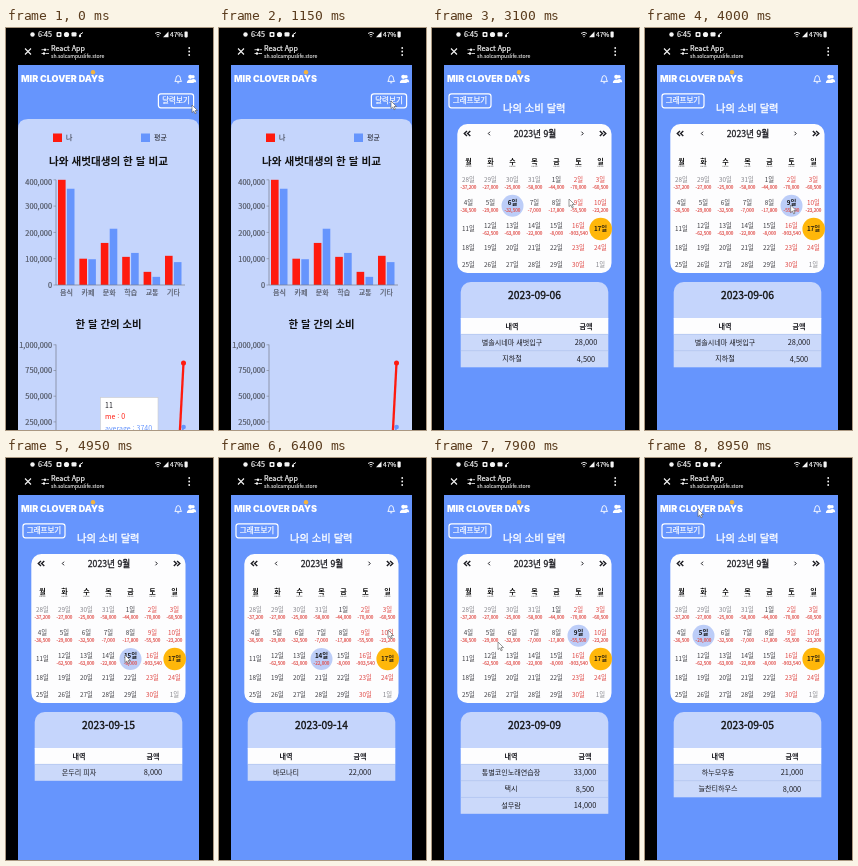
An HTML page that plays this animation: 207x402 px, repeating every 9 s.

```html
<!DOCTYPE html>
<html lang="ko">
<head>
<meta charset="utf-8">
<title>React App</title>
<style>
html, body { margin: 0; width: 100%; height: 100%; overflow: hidden; background: #000; }
svg { display: block; width: 100vw; height: 100vh; font-family: "Noto Sans CJK KR", "Noto Sans CJK", sans-serif; }
.on { fill: #111; font-weight: 700; }
</style>
</head>
<body>
<svg id="stage" viewBox="0 0 207 402"></svg>
<script>
const LOOP = 9000, STEP = 50, PAGE_SWITCH = 1300, TIP_END = 100;
const LOAD = 150; // delay between choosing a day and its list
const BLUE = '#6695fd', PALE = '#c5d5fc', RED = '#ff1a0e', INK = '#1c1c22';

const attrs = o => Object.entries(o).map(([k, v]) => ` ${k}="${v}"`).join('');
const rect = (x, y, width, height, fill, more = {}) =>
  `<rect${attrs({ x, y, width, height, fill, ...more })}/>`;
const circle = (cx, cy, r, fill) => `<circle${attrs({ cx, cy, r, fill })}/>`;
const line = (d, stroke, width = 1, more = {}) =>
  `<path${attrs({ d, stroke, 'stroke-width': width, fill: 'none', ...more })}/>`;
const shape = (d, fill) => `<path${attrs({ d, fill })}/>`;
const group = (id, body) => `<g id="${id}">${body}</g>`;
const money = n => n.toLocaleString('en-US');

// y is the middle of the text line; a thin outline makes the medium weight
function text(x, y, str, size, fill = INK, anchor = 'middle', weight = 400, more = {}) {
  const medium = weight === 500 ? { stroke: fill, 'stroke-width': size * 0.03 } : {};
  return `<text${attrs({
    x, y: y + size * 0.36, 'font-size': size, fill, 'text-anchor': anchor,
    'font-weight': weight === 500 ? 400 : weight, ...medium, ...more
  })}>${str}</text>`;
}

function phoneBars() {
  const w = '#f4f4f4';
  return circle(26.5, 6.5, 2.2, w) +
    text(32, 6.5, '6:45', 7.2, w, 'start', 500) +
    rect(50.5, 4, 5, 5, w, { rx: 1 }) + circle(53, 6.5, 1.2, '#000') +
    circle(60.5, 6.5, 2.6, w) +
    rect(65.5, 4.2, 5, 4.4, w, { rx: 1 }) +
    line('M74 8.5V6.5L77 4.5', w, 1) + circle(74, 8, 1.2, w) +
    line('M149 5.5Q152 3 155 5.5M150.5 7Q152 5.7 153.5 7', w, 0.9) + circle(152, 8.6, 0.7, w) +
    shape('M157 9.2L162.5 3.6V9.2Z', w) +
    text(164, 6.5, '47%', 6.6, w, 'start', 500) +
    rect(178.5, 3.6, 3.2, 5.8, w, { rx: 0.8 }) +
    line('M19 20.5L25 26.5M25 20.5L19 26.5', w, 1.1) +
    line('M35.5 21.7H38M40.5 21.7H43M35.5 25.5H37M39.5 25.5H43', w, 0.8) +
    circle(39, 21.7, 1.2, w) + circle(38, 25.5, 1.2, w) +
    text(45, 20.8, 'React App', 7.2, w, 'start', 500) +
    text(45, 28.4, 'sh.solcampuslife.store', 5.1, '#d8d8d8', 'start', 500) +
    [20, 23.5, 27].map(y => circle(183.2, y, 0.9, w)).join('');
}

function siteHeader() {
  return circle(87, 44.2, 2.2, '#f4b43d') +
    text(15, 51, 'MIR CLOVER DAYS', 9, '#fff', 'start', 900, { 'font-family': 'Inter, sans-serif' }) +
    line('M168.8 53.4Q170 52.3 170 50.2Q170 47.8 172.2 47.6Q174.4 47.8 174.4 50.2Q174.4 52.3 175.6 53.4Z', '#fff', 0.9) +
    line('M171.2 54.8H173.2', '#fff', 0.9) +
    circle(187, 48.7, 1.7, '#fff') + shape('M184.8 54.2Q185 51 187.3 51Q190 51 190.2 54.2Z', '#fff') +
    circle(184.3, 48.8, 2.1, '#fff') + shape('M180.8 55Q181 51.5 184.3 51.5Q187.6 51.5 187.8 55Z', '#fff');
}

const button = (x, width, label) =>
  rect(x, 65.8, width, 14, 'none', { rx: 2.5, stroke: '#fff', 'stroke-width': 1.2 }) +
  text(x + width / 2, 72.6, label, 7.5, '#fff', 'middle', 500);

function graphPage() {
  const mine = [400, 100, 160, 107, 50, 111], mean = [366, 98, 214, 122, 31, 87];
  const names = ['음식', '카페', '문화', '학습', '교통', '기타'];
  const base = 257, unit = 105.2 / 400, axis = '#777c8c', label = '#555a68';
  let s = button(152.4, 35.2, '달력보기') +
    shape('M12 402V101Q12 91 22 91H183Q193 91 193 101V402Z', PALE) +
    rect(47, 105.5, 9, 8.5, RED) + text(60, 109.8, '나', 7, INK, 'start') +
    rect(135, 105.5, 9, 8.5, BLUE) + text(148, 109.8, '평균', 7, INK, 'start') +
    text(102.5, 133, '나와 새벗대생의 한 달 비교', 10.6, '#111', 'middle', 700);
  for (let i = 0; i <= 4; i++) {
    const y = base - i * 100 * unit;
    s += line(`M47.5 ${y}H50`, axis, 0.6) +
      text(46, y + (i === 4 ? 3 : 0.5), money(i * 100000), 7.4, label, 'end', 500);
  }
  names.forEach((name, i) => {
    const x = 50 + 21.4 * i;
    s += rect(x + 2, base - mine[i] * unit, 7.6, mine[i] * unit, RED) +
      rect(x + 10.9, base - mean[i] * unit, 7.6, mean[i] * unit, BLUE) +
      text(x + 10.5, 264, name, 7, label, 'middle', 500);
  });
  s += line('M50 151.8V257H179', axis, 0.7) +
    text(102.5, 296.5, '한 달 간의 소비', 10.4, '#111', 'middle', 700) +
    line('M50 316.5V402', axis, 0.7);
  for (let i = 0; i < 4; i++) {
    const y = 316.8 + i * 25.7;
    s += line(`M47.5 ${y}H50`, axis, 0.6) +
      text(46, y + 0.3, money(1e6 - i * 250000), 7.4, label, 'end', 500);
  }
  return s + line('M172 417L177.6 399', BLUE, 1.6) + circle(177.6, 399, 2.3, BLUE) +
    line('M173 420L177.5 335', RED, 2.3) + circle(177.5, 335, 2.5, RED) +
    group('tip', rect(94.5, 369.5, 57.5, 40, '#fff', { stroke: '#ccc', 'stroke-width': 0.6 }) +
      text(99, 377.5, '11', 7, INK, 'start') +
      text(99, 388.5, 'me : 0', 7, RED, 'start') +
      text(99, 400, 'average : 3740', 7, BLUE, 'start'));
}

const colX = i => 36.5 + 22 * i;
const rowY = [154.8, 177.8, 201, 220, 236.5];
const spent = [
  [37200, 27000, 25000, 58000, 44000, 70000, 60500],
  [36500, 29000, 32500, 7000, 17800, 55500, 23200],
  [0, 62500, 63000, 22000, 8000, 903540, 0]
];

function calendarPage() {
  let s = button(17, 42, '그래프보기') +
    text(102.3, 80.3, '나의 소비 달력', 10.3, '#fff', 'middle', 500) +
    rect(25.3, 96, 154.2, 149, '#fdfdfe', { rx: 10 }) +
    text(103, 105.5, '2023년 9월', 8.7, INK, 'middle', 500) +
    line('M35 103L32.3 105.5L35 108M38.3 103L35.6 105.5L38.3 108M167.8 103L170.5 105.5L167.8 108M171.1 103L173.8 105.5L171.1 108', INK, 1.4) +
    line('M58 103.7L56.3 105.5L58 107.3M149.5 103.7L151.2 105.5L149.5 107.3', INK, 1) +
    circle(168.7, 201, 11.3, '#ffb70a') +
    `<circle id="pick" r="11" fill="#bccdf8"/>`;
  [...'월화수목금토일'].forEach((d, i) => {
    s += text(colX(i), 133.5, d, 7, '#111', 'middle', 700) +
      line(`M${colX(i) - 3} 138.3h6.4`, '#333', 0.6, { 'stroke-dasharray': '1 .6' });
  });
  for (let n = 0; n < 35; n++) {
    const col = n % 7, row = Math.floor(n / 7);
    const day = n < 4 ? n + 28 : n < 34 ? n - 3 : 1;
    const inMonth = n > 3 && n < 34, today = n === 20;
    const cost = spent[row]?.[col];
    const fill = today ? '#2a2010' : !inMonth ? '#85858b' : col > 4 ? '#df4440' : '#3c3c42';
    s += text(colX(col), rowY[row] - (cost ? 3 : 0), day + '일', 6.3, fill, 'middle', today ? 700 : 400,
      inMonth ? { id: 'day' + day } : {});
    if (cost) s += text(colX(col), rowY[row] + 4.1, '-' + money(cost), 4.7, '#e0504c', 'middle', 500);
  }
  return s + group('panel', '');
}

// per day: centre of the first column, then name and amount pairs
const details = {
  5: [73, ['하누모우동', 21000], ['늘찬티하우스', 8000]],
  6: [80, ['별솔시네마 새벗입구', 28000], ['지하철', 4500]],
  9: [79, ['통별코인노래연습장', 33000], ['택시', 8500], ['설무람', 14000]],
  14: [67, ['바모나티', 22000]],
  15: [73, ['온두리 피자', 8000]]
};

function panel(day) {
  const [cx, ...rows] = details[day], ax = cx + 74, left = 28.7, width = 147.6;
  let s = rect(left, 254, width, 46, PALE, { rx: 10 }) +
    text(102.5, 266.8, '2023-09-' + String(day).padStart(2, '0'), 10.3, '#111', 'middle', 500) +
    rect(left, 290, width, 16.3, '#fdfdfe') +
    text(cx, 298, '내역', 7.1, INK, 'middle', 700) + text(ax, 298, '금액', 7.1, INK, 'middle', 700);
  rows.forEach(([name, cost], i) => {
    const y = 306.3 + 16.5 * i;
    s += rect(left, y, width, 16.5, '#cbd9fa') + line(`M${left} ${y}h${width}`, '#b9c6e6', 0.5) +
      text(cx, y + 8.1, name, 7.1) + text(ax, y + 8.1, money(cost), 7.4);
  });
  return s;
}

const picks = [[2800, 6], [3900, 9], [4700, 15], [6150, 14], [6950, 9], [8650, 5]];
const track = [
  [0, 186, 77], [500, 178, 75], [950, 172, 73], [1200, 172, 73], [1700, 138, 143], [1900, 133, 147],
  [2700, 83, 176], [2900, 84, 176], [3100, 137, 171], [3500, 147, 176], [3900, 147, 176],
  [4650, 119, 197], [5100, 119, 197], [5500, 124, 204], [5850, 124, 204], [6000, 102, 200], [6150, 102, 200],
  [6400, 169, 172], [6800, 148, 176], [7100, 148, 176], [7900, 66, 184], [8500, 58, 176], [8650, 58, 176],
  [8950, 53, 51], [9000, 53, 51]
];

function cursorAt(t) {
  const i = track.findIndex(p => p[0] > t);
  const [t0, x0, y0] = track[i - 1], [t1, x1, y1] = track[i];
  const u = (t - t0) / (t1 - t0), e = u * u * (3 - 2 * u);
  return [x0 + (x1 - x0) * e, y0 + (y1 - y0) * e];
}

const $ = id => document.getElementById(id);
$('stage').innerHTML = rect(0, 0, 207, 402, '#000') + phoneBars() +
  rect(12, 37, 181, 365, BLUE) + siteHeader() +
  group('graph', graphPage()) + group('calendar', calendarPage()) +
  '<path id="cursor" d="M0 0V7.6L1.8 6L3 8.8L4.3 8.2L3.1 5.5H5.5Z" fill="#fff" stroke="#555" stroke-width=".6"/>';

const show = (id, on) => $(id).setAttribute('display', on ? 'inline' : 'none');
const dayAt = t => picks.reduce((day, [at, d]) => t >= at ? d : day, 0);
let picked = 0, listed = 0;

function pick(day) {
  show('pick', day);
  if (day === picked) return;
  if (picked) $('day' + picked).classList.remove('on');
  picked = day;
  if (!day) return;
  const n = day + 3;
  $('pick').setAttribute('cx', colX(n % 7));
  $('pick').setAttribute('cy', rowY[Math.floor(n / 7)]);
  $('day' + day).classList.add('on');
}

function list(day) {
  if (day === listed) return;
  listed = day;
  $('panel').innerHTML = day ? panel(day) : '';
}

function draw(t) {
  show('graph', t < PAGE_SWITCH);
  show('calendar', t >= PAGE_SWITCH);
  show('tip', t < TIP_END);
  pick(dayAt(t));
  list(dayAt(t - LOAD));
  $('cursor').setAttribute('transform', `translate(${cursorAt(t)})`);
}

const start = performance.now();
function tick() {
  const t = (performance.now() - start) % LOOP;
  draw(Math.floor(t / STEP) * STEP);
  requestAnimationFrame(tick);
}
tick();
</script>
</body>
</html>
```
